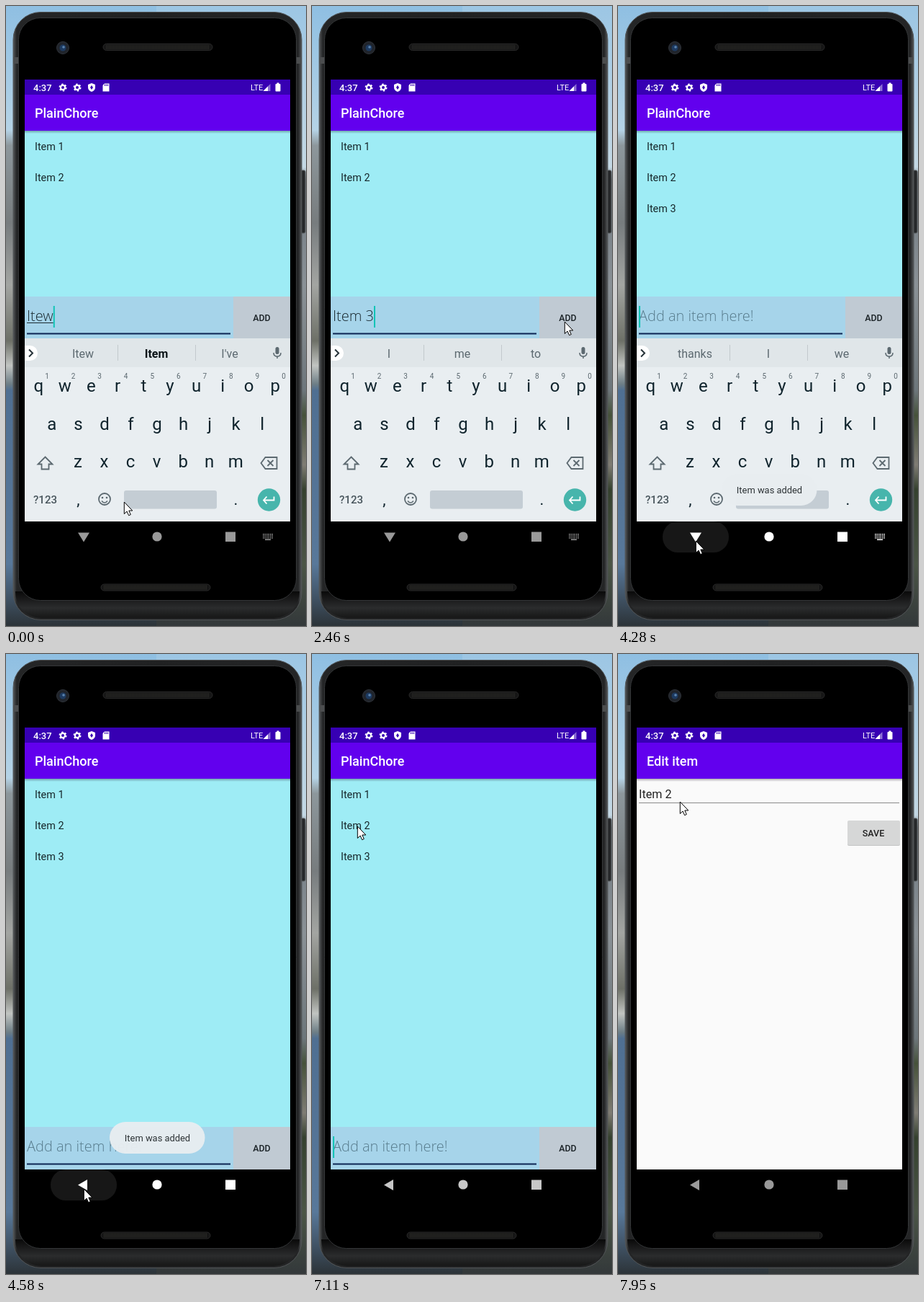
An HTML page with a canvas that plays this animation: 417x860 px, repeating every 8000 ms.

```html
<!DOCTYPE html>
<html lang="en">
<head>
<meta charset="utf-8">
<title>To-do app demo</title>
<style>
  html, body { margin: 0; height: 100%; overflow: hidden; background: #000; }
  canvas { display: block; }
</style>
</head>
<body>
<canvas id="stage" width="417" height="860"></canvas>
<script>
const ctx = document.getElementById('stage').getContext('2d');
const LOOP = 8000;
const ROBOTO = 'Roboto, sans-serif';
const HAND = '300 20px "Open Sans", sans-serif';

// Bursts of screen updates: start, end, number of steps
const bursts = [
  [120, 510, 4], [1070, 1190, 2], [1500, 2460, 8], [2890, 3850, 8],
  [4280, 5210, 8], [5360, 5870, 5], [6300, 7260, 8], [7380, 7950, 5]
];

// Pointer: time, x, y
const pointerPath = [
  [0, 164, 688], [1190, 164, 688], [1500, 188, 626], [1650, 188, 626],
  [2460, 351, 438], [3027, 351, 438], [3301, 137, 712], [3850, 108, 742],
  [4700, 108, 742], [5210, 60, 163], [5360, 15, 185], [5615, 370, 159],
  [5870, 110, 200], [6300, 100, 210], [6700, 63, 239], [7380, 63, 239],
  [7950, 86, 205]
];

const clamp = v => Math.max(0, Math.min(1, v));

function snap(t) {
  let s = 0;
  for (const [start, end, count] of bursts) {
    if (t < start) break;
    const step = (end - start) / (count - 1);
    s = Math.min(end, start + Math.floor((t - start + 15) / step) * step);
  }
  return s;
}

function pointerAt(t) {
  const i = pointerPath.findIndex(p => p[0] > t);
  if (i < 0) return pointerPath.at(-1).slice(1);
  const [t0, x0, y0] = pointerPath[i - 1], [t1, x1, y1] = pointerPath[i];
  const k = (t - t0) / (t1 - t0);
  return [x0 + (x1 - x0) * k, y0 + (y1 - y0) * k];
}

function rect(x, y, w, h, color) {
  ctx.fillStyle = color;
  ctx.fillRect(x, y, w, h);
}

function pill(x, y, w, h, r, fill, stroke) {
  ctx.beginPath();
  ctx.roundRect(x, y, w, h, r);
  paint(fill, stroke);
}

function circle(x, y, r, fill, stroke, width) {
  ctx.beginPath();
  ctx.arc(x, y, r, 0, 7);
  paint(fill, stroke, width);
}

function shape(d, x, y, fill, stroke, width) {
  ctx.save();
  ctx.translate(x, y);
  paint(fill, stroke, width, new Path2D(d));
  ctx.restore();
}

function paint(fill, stroke, width = 1, path) {
  if (fill) { ctx.fillStyle = fill; path ? ctx.fill(path) : ctx.fill(); }
  if (stroke) {
    ctx.strokeStyle = stroke;
    ctx.lineWidth = width;
    path ? ctx.stroke(path) : ctx.stroke();
  }
}

function text(str, x, y, font, color, align = 'left') {
  ctx.font = font;
  ctx.fillStyle = color;
  ctx.textAlign = align;
  ctx.fillText(str, x, y);
}

function roboto(str, x, y, size, color, align, weight = 400) {
  text(str, x, y, `${weight} ${size}px ${ROBOTO}`, color, align);
}

function gradient(x0, y0, x1, y1, stops) {
  const g = ctx.createLinearGradient(x0, y0, x1, y1);
  stops.forEach(([at, color]) => g.addColorStop(at, color));
  return g;
}

function clipped(x, y, w, h, draw) {
  ctx.save();
  ctx.beginPath();
  ctx.rect(x, y, w, h);
  ctx.clip();
  draw();
  ctx.restore();
}

function drawSpeaker(x, y) {
  pill(x, y, 152, 9, 4.5, '#161616', '#2a2a2a');
  ctx.setLineDash([1, 1]);
  for (let row = 3; row < 8; row += 2)
    shape('M0 0H144', x + 4, y + row - 0.5, null, '#3d3d36');
  ctx.setLineDash([]);
}

function drawPhone() {
  rect(0, 0, 209, 860, gradient(0, 0, 0, 860, [
    [0, '#8fbfe2'], [0.2, '#b5d3e6'], [0.225, '#8d979c'], [0.35, '#777c7e'], [0.45, '#a3a5a2'],
    [0.54, '#6d7067'], [0.58, '#c1c4c1'], [0.61, '#6d7e86'], [0.62, '#4f6f92'], [0.9, '#58789a'], [1, '#2c3338']
  ]));
  rect(209, 0, 208, 860, gradient(0, 0, 0, 860, [
    [0, '#9cc6e4'], [0.26, '#c4d8e4'], [0.28, '#6f7880'], [0.45, '#8a9196'], [0.62, '#6d767b'],
    [0.66, '#46523a'], [0.74, '#7f7c74'], [0.78, '#35412e'], [0.9, '#4b5546'], [1, '#33383a']
  ]));
  pill(410, 228, 6, 87, 2, '#26282a', '#55585a');
  pill(10, 8.5, 401, 843, 38, gradient(10, 0, 411, 0, [
    [0, '#55585a'], [0.012, '#242526'], [0.5, '#202122'], [0.988, '#242526'], [1, '#55585a']
  ]), '#515456');
  rect(10, 71, 8, 9, '#4b4d4e');
  rect(403, 71, 8, 9, '#4b4d4e');
  pill(13, 812, 395, 37, [0, 0, 36, 36], gradient(0, 812, 0, 850, [[0, '#0a0a0a'], [0.6, '#2b2c2d'], [1, '#151515']]));
  pill(17.5, 16.5, 386, 808, 30, '#000', '#343638');
  circle(79, 58, 8.5, '#20242b', '#30343a');
  circle(79, 58, 4.5, '#1d3a60');
  circle(80, 57, 1.8, '#5b83ae');
  drawSpeaker(135, 52.5);
  drawSpeaker(132, 802);
}

function drawNav(s, keyboardOpen) {
  const level = Math.round(s < 4280 ? 153 : 255 - 102 * clamp((s - 6620) / 910));
  const color = `rgb(${level},${level},${level})`;
  if (s >= 4280 && s < 4800) pill(62, 715, 92, 43, 21, '#171717');
  if (keyboardOpen) shape('M-8 -6H8L0 7Z', 108, 736.5, color);
  else shape('M-7 0L6 -7.5V7.5Z', 107, 736.5, color);
  circle(210, 736, 6.6, color);
  rect(305, 729.5, 14, 13.5, color);
  if (keyboardOpen) {
    for (let row = 0; row < 3; row++)
      for (let col = 0; col < 6; col++) rect(357 + col * 2.5, 732 + row * 2.5, 1.5, 1.5, color);
    rect(360, 739.5, 8, 1.5, color);
  }
}

function drawStatus() {
  roboto('4:37', 38, 117.5, 13, '#fff', 'left', 500);
  for (const x of [79, 99]) {
    circle(x, 113, 3.1, null, '#fff', 2.2);
    ctx.setLineDash([2.3, 2.42]);
    circle(x, 113, 4.5, null, '#fff', 2);
    ctx.setLineDash([]);
  }
  shape('M0 -6L5 -4V0Q5 4 0 6Q-5 4 -5 0V-4Z', 119, 113, '#fff');
  shape('M0 -3L2 0L0 3L-2 0Z', 119, 113, '#3700b3');
  shape('M-2 -5.5H4.5V5.5H-4.5V-3Z', 139, 113, '#fff');
  for (const x of [137, 139, 141]) rect(x, 108.5, 1, 2.5, '#3700b3');
  roboto('LTE', 340, 116.5, 11, '#fff');
  shape('M0 10L10 0V10Z', 357.5, 108, '#8d6fd4');
  shape('M0 10L6.5 3.5V10Z', 357.5, 108, '#fff');
  pill(374.5, 108, 7, 10.5, 1, '#fff');
  rect(376.5, 106.5, 3, 2, '#fff');
}

function drawAppBar(title) {
  rect(26, 173, 369, 4, gradient(0, 173, 0, 177, [[0, 'rgba(0,0,0,.3)'], [1, 'rgba(0,0,0,0)']]));
  rect(26, 102, 369, 21, '#3700b3');
  rect(26, 123, 369, 50, '#6200ee');
  roboto(title, 40, 155, 18, '#fff', 'left', 500);
}

function typedText(s) {
  if (s < 120) return 'Itew';
  if (s < 370) return 'Ite';
  if (s < 1070) return 'Item';
  if (s < 1900) return 'Item ';
  return s < 3000 ? 'Item 3' : '';
}

function suggestions(s) {
  if (s < 120) return ['Itew', 'Item', "I've"];
  if (s < 370) return ['Ite', 'Item', 'Items'];
  if (s < 1070) return ['item', 'Item', 'Items'];
  return s < 3000 ? ['I', 'me', 'to'] : ['thanks', 'I', 'we'];
}

function drawInput(s, y) {
  rect(26, y, 369, 59, '#a6d4ea');
  rect(316, y, 79, 59, '#c0cad3');
  rect(29, y + 50.5, 283, 2, '#0c2552');
  roboto('ADD', 355.5, y + 34, 12.4, '#1b2327', 'center', 500);
  const typed = typedText(s);
  text(typed || 'Add an item here!', 29, y + 34, HAND, typed ? '#1a2a31' : '#587c8d');
  const width = typed ? ctx.measureText(typed).width : 0;
  if (s < 1070) rect(29, y + 36, width, 1, '#1a2a31');
  if (s < 2890 || s % 1000 < 500) rect(29 + width, y + 13, 2, 30, '#12c4b6');
}

function drawHome(s, keyboardOpen) {
  rect(26, 173, 369, 542, '#9eecf5');
  drawAppBar('PlainChore');
  const count = s < 3000 ? 2 : 3;
  for (let i = 0; i < count; i++) roboto(`Item ${i + 1}`, 40, 200 + 43 * i, 14.4, '#16262a');
  drawInput(s, keyboardOpen ? 403 : 656);
}

function drawKeyboard(s) {
  const ink = '#10242d', gray = '#5c6970', pitch = 36.55;
  rect(26, 461, 369, 254, '#e9eef1');
  rect(26, 461, 369, 40, '#e0e6e9');
  pill(26, 471, 18, 21, [0, 10.5, 10.5, 0], '#fff');
  shape('M-3 -5L2 0L-3 5', 35, 481.5, null, '#263238', 2);
  suggestions(s).forEach((word, i) => {
    const best = i === 1 && s < 1070;
    roboto(word, 107 + 102 * i, 487.5, 16, best ? '#0b1418' : gray, 'center', best ? 700 : 400);
  });
  rect(155, 470, 1, 22, '#c2c9cd');
  rect(263, 470, 1, 22, '#c2c9cd');
  pill(374.5, 473, 5, 10, 2.5, gray);
  shape('M-5 0Q-5 5 0 5Q5 5 5 0M0 5V8', 377, 481, null, gray, 1.5);

  [['qwertyuiop', 45.3, 535], ['asdfghjkl', 63.8, 588], ['zxcvbnm', 100, 640]].forEach(([row, x, y]) =>
    [...row].forEach((key, i) => roboto(key, x + pitch * i, y, 24, ink, 'center')));
  for (let i = 0; i < 10; i++) roboto((i + 1) % 10, 57 + pitch * i, 517, 10, gray, 'center');

  shape('M0 -9L10 1H5V8H-5V1H-10Z', 54.5, 634.5, null, gray, 1.8);
  shape('M-11 0L-5 -8H11V8H-5ZM-2 -4L6 4M6 -4L-2 4', 365.5, 634, null, gray, 1.8);
  roboto('?123', 54.5, 690, 15, '#47545b', 'center', 500);
  roboto(',', 100.5, 692, 22, ink, 'center');
  roboto('.', 319.5, 692, 22, ink, 'center');
  circle(137, 684, 8, null, gray, 1.8);
  circle(134, 682, 1.3, gray);
  circle(140, 682, 1.3, gray);
  shape('M-4 0Q0 5 4 0', 137, 686.5, null, gray, 1.6);
  pill(164, 672, 129, 25.5, 3, '#c4cdd4');
  circle(365.5, 685, 15.7, '#47b5ac');
  shape('M7 -4V1H-7M-3 -4L-7.5 1L-3 6', 365.5, 684.5, null, '#fff', 1.8);
}

function drawEdit() {
  rect(26, 102, 369, 613, '#fafafa');
  drawAppBar('Edit item');
  roboto('Item 2', 29, 199.5, 16.2, '#212121');
  rect(29, 206, 362, 1, '#8a8a8a');
  pill(319, 232, 73, 34, 2, '#c3c4c4');
  pill(319, 231, 73, 34, 2, '#d6d7d7');
  roboto('SAVE', 355, 252.5, 12.5, '#212121', 'center', 500);
}

function drawToast(s) {
  const alpha = clamp((s - 3080) / 270) * clamp((5650 - s) / 350);
  if (!alpha) return;
  ctx.globalAlpha = alpha;
  pill(144, 649, 132.5, 44, 22, 'rgba(233,238,241,.96)');
  roboto('Item was added', 210.5, 676, 12.9, '#2c3235', 'center');
  ctx.globalAlpha = 1;
}

function drawPointer(s) {
  const [x, y] = pointerAt(s);
  shape('M0 0V16.5L3.8 13L6.3 18.7L9 17.5L6.5 12H11.5Z', x + 0.3, y, '#fff', '#000', 1);
}

function draw(t) {
  const s = snap(t);
  const keyboardOpen = s < 4400;
  drawPhone();
  drawNav(s, keyboardOpen);

  const opening = clamp((s - 7255) / 262);
  if (opening < 1) {
    const leaving = s >= 7255;
    clipped(26, 102, 369, 613, () => {
      ctx.save();
      if (leaving) ctx.translate(0, -2 - 10 * opening);
      drawHome(s, keyboardOpen);
      ctx.restore();
      if (s < 4500) {
        ctx.translate(0, keyboardOpen ? 0 : 110);
        drawKeyboard(s);
      } else if (leaving) rect(26, 102, 369, 613, 'rgba(0,0,0,.09)');
    });
  }
  if (s >= 7255) {
    const rise = 22.5 * (1 - opening) ** 2;
    const top = s < 7300 ? 343 : 102;
    clipped(26, top, 369, 740 - top, () => {
      ctx.translate(0, rise);
      drawEdit();
    });
  }
  drawStatus();
  drawToast(s);
  drawPointer(s);
}

function tick(now) {
  draw(now % LOOP);
  requestAnimationFrame(tick);
}
requestAnimationFrame(tick);
</script>
</body>
</html>
```
